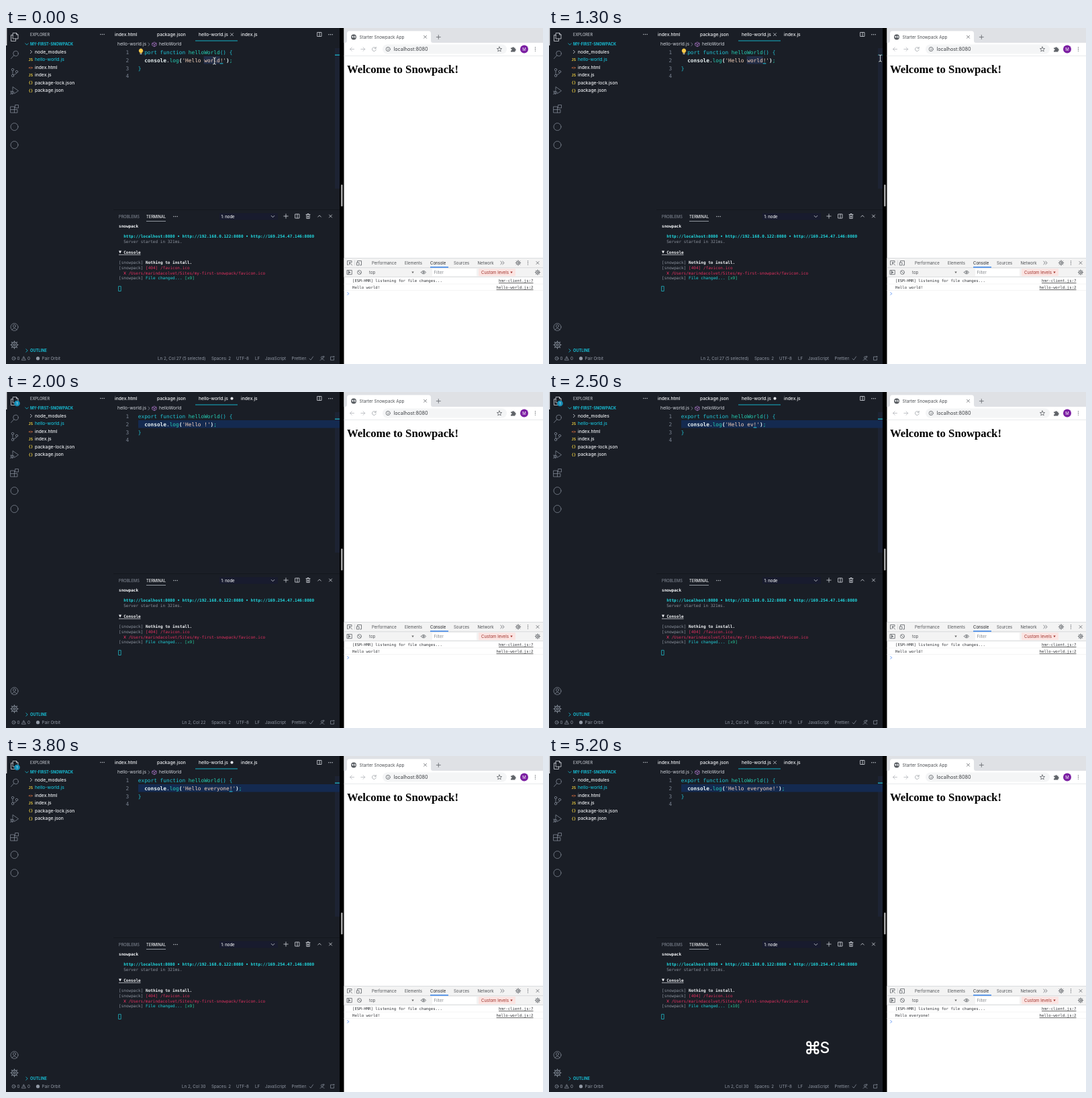
Recreate the animation shown at these times as an HTML page. Size 800 by 500 pixels, loop 5.3 s.

```html
<!DOCTYPE html>
<html lang="en">
<head>
<meta charset="utf-8">
<title>Editor and browser</title>
<style>
  html, body { margin: 0; width: 100%; height: 100%; overflow: hidden; background: #000; }
  svg { display: block; }
  text { font-family: Inter, "Open Sans", sans-serif; font-size: 6.7px; fill: #d3d7de; white-space: pre; }
  .b { font-weight: 700; }
  .ui { fill: #eef0f3; font-weight: 500; }
  .caps { font-size: 5.7px; }
  .muted { fill: #8f96a2; }
  .status { font-size: 6.2px; fill: #9299a5; }
  .cyan { fill: #17bcd3; }
  .code text { font: 7.79px "DejaVu Sans Mono", monospace; fill: #20c4d6; }
  .code .num { fill: #7b8492; }
  .code .fn { fill: #25cfb4; }
  .code .pale { fill: #e8f2f3; }
  .code .str { fill: #f8d3bb; }
  .term text { font: 6.05px "DejaVu Sans Mono", monospace; fill: #8b929d; }
  .term .b { font-weight: 700; fill: #f4f6f8; }
  .term .link { fill: #21dbe2; }
  .term .ok { fill: #21d0d8; }
  .term .count { fill: #27cf9e; }
  .term .bad { fill: #e0305f; }
  .chrome text { fill: #4a4d51; }
  .dev text { font-size: 6px; fill: #4e5155; }
  .log text { font: 5.71px "DejaVu Sans Mono", monospace; fill: #303236; }
  .line { fill: none; stroke-width: .8; stroke-linecap: round; stroke-linejoin: round; }
  .dim { stroke: #7f8793; }
  .lit { stroke: #d3d7de; }
  .grey { stroke: #5f6368; }
</style>
</head>
<body>
<svg width="800" height="500" viewBox="0 0 800 500">
  <defs>
    <path id="x" d="M-2-2 2 2M2-2-2 2"/>
    <path id="right" d="M-1.2-2.2 1.2 0-1.2 2.2"/>
    <path id="down" d="M-2.3-1.1 0 1.2 2.3-1.1"/>
    <g id="dots"><circle cx="-2.6" r=".7"/><circle r=".7"/><circle cx="2.6" r=".7"/></g>
    <g id="split"><rect x="-3" y="-3" width="6" height="6"/><path d="M0-3V3"/></g>
    <g id="gear"><circle r="2.6"/><circle r="1"/><path d="M0-3.8V-2.6M0 3.8V2.6M-3.8 0H-2.6M3.8 0H2.6M-2.7-2.7-1.9-1.9M2.7 2.7 1.9 1.9M2.7-2.7 1.9-1.9M-2.7 2.7-1.9 1.9"/></g>
    <path id="ibeam" d="M-2-5Q0-5 0-3.5Q0-5 2-5M0-3.5V3.5M-2 5Q0 5 0 3.5Q0 5 2 5"/>
  </defs>

  <!-- editor window -->
  <rect width="497" height="500" fill="#1a1e26"/>
  <path d="M160 270.5H497" stroke="#14171e"/>
  <rect width="1.3" height="26" fill="#e8ebef"/>

  <g class="line dim">
    <path class="lit" d="M10.5 7.5H15.5L18 10V16H10.5ZM15.5 7.5V10H18M10.5 10.5H7.5V19.5H14.5V16"/>
    <circle cx="14.5" cy="38" r="3.8"/><path d="M11.8 40.7 7.5 45.5"/>
    <circle cx="10" cy="62" r="1.7"/><circle cx="10" cy="71" r="1.7"/><circle cx="16" cy="65" r="1.7"/>
    <path d="M10 64V69M16 67Q15.5 69 11.5 69.5"/>
    <path d="M10 92V87.5L18.5 93.5 12.5 97.5"/><circle cx="9.5" cy="96" r="2.2"/><path d="M6.5 94 8 95M6.5 98.5 8 97.5M9.5 93.8V98"/>
    <path d="M7 117H12.5V126H7ZM7 121.5H17V126H12.5M14 114.5H18.5V119H14Z"/>
    <circle cx="12.5" cy="147" r="5.5"/>
    <circle cx="12.5" cy="174" r="5.5"/>
    <circle cx="12.5" cy="445" r="5.5"/><circle cx="12.5" cy="443.5" r="2"/><path d="M8.8 449Q12.5 444.5 16.2 449"/>
    <use href="#gear" transform="translate(12.5 471.5) scale(1.5)"/>
  </g>
  <g id="badge">
    <circle cx="16.5" cy="17" r="4.3" fill="#168fb8"/>
    <text x="16.5" y="19" text-anchor="middle" style="font-size:5px" class="ui">1</text>
  </g>

  <!-- explorer -->
  <text x="36" y="11.5" class="caps">EXPLORER</text>
  <use href="#dots" x="143.5" y="9.5" fill="#c4c8cf"/>
  <g class="line" stroke="#17bcd3"><use href="#down" x="31" y="24"/><use href="#right" x="31" y="480"/></g>
  <text x="36" y="26.2" class="caps b cyan">MY-FIRST-SNOWPACK</text>
  <text x="36" y="482.2" class="caps b cyan">OUTLINE</text>
  <use href="#right" x="37.5" y="35.5" class="line lit"/>
  <g id="files"></g>

  <!-- tabs and breadcrumb -->
  <text x="162" y="12" class="ui">index.html</text>
  <text x="225" y="12" class="ui">package.json</text>
  <text x="287" y="12" class="ui">hello-world.js</text>
  <text x="350" y="12" class="ui">index.js</text>
  <rect x="282" y="18.5" width="63" height="1" fill="#14afc6"/>
  <use id="close" href="#x" x="336.5" y="9.7" class="line lit"/>
  <circle id="unsaved" cx="336.5" cy="9.7" r="2.1" fill="#e4e7ec"/>
  <use href="#split" x="467" y="9.5" class="line lit"/>
  <use href="#dots" x="483.5" y="9.7" fill="#d3d7de"/>
  <text x="166" y="26.4">hello-world.js</text>
  <use href="#right" x="213" y="24.3" class="line dim"/>
  <path class="line" stroke="#a774c4" d="M218 22.7 221 21 224 22.7V26L221 27.7 218 26ZM218 22.7 221 24.3 224 22.7M221 24.3V27.7"/>
  <text x="228" y="26.4">helloWorld</text>

  <!-- code -->
  <g class="code">
    <rect x="490" y="30" width="7" height="209" fill="#1d2333"/>
    <rect id="row" x="197" y="42" width="300" height="11.5" fill="#142a50"/>
    <rect id="selection" x="294.6" y="42" width="24" height="11.5" fill="#222d47"/>
    <g id="numbers"></g>
    <text x="196.8" y="38.9">export function <tspan class="fn">helloWorld</tspan>() {</text>
    <text x="206.2" y="50.7" class="pale"><tspan class="b">console</tspan>.<tspan class="fn">log</tspan><tspan class="b">(</tspan><tspan class="str" id="string"></tspan><tspan class="b">)</tspan><tspan class="fn">;</tspan></text>
    <text x="196.8" y="62.5">}</text>
    <rect id="caret" y="52.3" width="4.6" height="1.1" fill="#29c3dc"/>
    <rect x="490" y="39.5" width="7" height="1.5" fill="#1b9fb4"/>
    <g id="bulb">
      <rect x="196" y="30" width="9" height="11" fill="#1a1e26"/>
      <path d="M199.3 36.5A3.2 3.2 0 1 1 202.7 36.5V37.5H199.3Z" fill="#f7c948"/>
      <path d="M199.6 38.6H202.4" stroke="#d5d9df"/>
    </g>
  </g>
  <g id="beam" class="line">
    <use href="#ibeam" stroke="#111" stroke-width="2"/>
    <use href="#ibeam" stroke="#c9d3dd" stroke-width="1.1"/>
  </g>

  <!-- terminal panel -->
  <text x="168" y="282.5" class="caps muted">PROBLEMS</text>
  <text x="209" y="282.5" class="caps ui">TERMINAL</text>
  <path d="M209 287.5H238" stroke="#aeb4bd" stroke-width=".8"/>
  <use href="#dots" x="252.5" y="280.5" fill="#c4c8cf"/>
  <rect x="318" y="275.5" width="87" height="10" fill="#181b2e"/>
  <text x="320.5" y="282.5" style="font-size:5.9px" class="ui">1: node</text>
  <g class="line lit">
    <use href="#down" x="397.5" y="280.5"/>
    <path d="M413.8 280H420.2M417 276.8V283.2"/>
    <use href="#split" x="434" y="280"/>
    <path d="M447 277.5H453M449 277.5V276.5H451V277.5M447.8 278V283.5H452.2V278M449.3 279.5V282M450.7 279.5V282"/>
    <use href="#down" transform="translate(467 280) scale(1 -1)"/>
    <use href="#x" x="483.5" y="280"/>
  </g>
  <g class="term">
    <text x="168" y="297.3" class="b">snowpack</text>
    <text x="175.2" y="312.3" class="b link">http://localhost:8080 • http://192.168.0.122:8080 • http://169.254.47.146:8080</text>
    <text x="175.2" y="320">Server started in 321ms.</text>
    <path d="M168 331.5H172L170 335.8Z" fill="#f0f2f5"/>
    <text x="175.2" y="335.8" class="b">Console</text>
    <path d="M168 337.5H200.5" stroke="#d8dce2" stroke-width=".7"/>
    <text x="168" y="351.2">[snowpack] <tspan class="b">Nothing to install.</tspan></text>
    <text x="168" y="358.8">[snowpack] <tspan class="bad">[404] /favicon.ico</tspan></text>
    <path class="line" stroke="#e0305f" d="M175.8 363 178.3 366.5M178.3 363 175.8 366.5"/>
    <text x="182.4" y="366.5" class="bad">/Users/marindacolvet/Sites/my-first-snowpack/favicon.ico</text>
    <text x="168" y="374.2">[snowpack] <tspan class="ok">File changed...</tspan> <tspan class="count" id="count"></tspan></text>
    <rect x="168" y="384.3" width="3.2" height="7.2" class="line" stroke="#20b9c6"/>
  </g>

  <!-- status bar -->
  <g class="line dim">
    <circle cx="11.5" cy="491.7" r="2.5"/><use href="#x" transform="translate(11.5 491.7) scale(.55)"/>
    <path d="M26.5 489 29.3 494.2H23.7ZM26.5 490.8V492.3"/>
    <path d="M452 492 454 494 457.5 489"/>
    <circle cx="471" cy="490.5" r="1.6"/><path d="M468 494.5Q471 490.5 474 494.5M472.5 488.5H474V490"/>
    <path d="M487 489.2H483.5V494.2H488.5V491.5"/><circle cx="488.2" cy="489.2" r=".7"/>
  </g>
  <circle cx="47.5" cy="491.7" r="2.6" fill="#9299a5"/>
  <text x="16.5" y="494" class="status">0</text>
  <text x="32" y="494" class="status">0</text>
  <text x="53.5" y="494" class="status">Pair Orbit</text>
  <text x="297.5" y="494" class="status" text-anchor="end" id="position"></text>
  <text x="306" y="494" class="status">Spaces: 2</text>
  <text x="343" y="494" class="status">UTF-8</text>
  <text x="371" y="494" class="status">LF</text>
  <text x="386" y="494" class="status">JavaScript</text>
  <text x="425.5" y="494" class="status">Prettier:</text>

  <!-- pressed keys -->
  <g id="command" fill="none" stroke="#fff" stroke-width="2.4">
    <path transform="scale(.95) translate(-12 -12)" d="M18 3a3 3 0 0 0-3 3v12a3 3 0 1 0 3-3H6a3 3 0 1 0 3 3V6a3 3 0 1 0-3 3h12a3 3 0 0 0 0-6z"/>
  </g>
  <text id="save" x="403.5" y="442" style="font-size:22.8px;font-weight:500;fill:#fff">S</text>

  <!-- gap with drag handle -->
  <rect x="499" y="233" width="2.6" height="32.5" rx="1.2" fill="#a4a4a4"/>

  <!-- browser -->
  <g class="chrome">
    <rect x="503.5" width="296.5" height="500" fill="#fff"/>
    <rect x="503.5" width="296.5" height="22" fill="#dfe1e5"/>
    <path d="M505 22Q508 22 508 19V8Q508 4.5 511.5 4.5H629.5Q633 4.5 633 8V19Q633 22 636 22Z" fill="#fff"/>
    <circle cx="518" cy="13.5" r="3.9" fill="#55595e"/>
    <path d="M515 12.5 517 11.5 518 13.5 516.5 15ZM519 11 521 13 520 15.5 518.7 13.5Z" fill="#e6e8ea"/>
    <text x="526.5" y="15.7" style="font-size:6.3px">Starter Snowpack App</text>
    <g class="line grey">
      <use href="#x" x="624.5" y="13.3"/>
      <path d="M641.3 13.5H647.3M644.3 10.5V16.5"/>
      <path d="M518.5 31.5H512.5M515.2 28.8 512.5 31.5 515.2 34.2M528.8 31.5H534.8M532 28.8 534.8 31.5 532 34.2" stroke="#b4b7bb"/>
      <path d="M550.8 30A2.9 2.9 0 1 0 551.2 32.3M551.2 28.3V30.3H549.2" stroke="#a0a4a9"/>
    </g>
    <rect x="561" y="24.5" width="185" height="14" rx="7" fill="#f4f5f6"/>
    <g class="line grey">
      <circle cx="569.2" cy="31.5" r="3.1"/><path d="M569.2 31.3V33M569.2 29.9V30"/>
      <path d="M735 28 736 30.4 738.6 30.6 736.6 32.3 737.2 34.8 735 33.5 732.8 34.8 733.4 32.3 731.4 30.6 734 30.4Z"/>
    </g>
    <text x="577.5" y="34.2" style="font-size:7.25px;fill:#3b3e42">localhost:8080</text>
    <path d="M752 29.5H754.2A1.3 1.3 0 1 1 756.8 29.5H758.5V31.2A1.3 1.3 0 1 1 758.5 33.8V35.5H752V33.5A1.2 1.2 0 1 0 752 31.2Z" fill="#5f6368"/>
    <circle cx="772" cy="31.5" r="6" fill="#7b1fa2"/>
    <text x="772" y="33.7" text-anchor="middle" style="font-size:6px;fill:#fff">M</text>
    <use href="#dots" transform="translate(788.5 31.5) rotate(90)" fill="#5f6368"/>
    <path d="M503.5 41.5H800" stroke="#e3e5e8" stroke-width=".8"/>
    <text x="508" y="67.3" style="font:700 16.7px 'Liberation Serif','Times New Roman',serif;fill:#000">Welcome to Snowpack!</text>
  </g>

  <!-- developer tools -->
  <g class="dev">
    <rect x="503.5" y="342.5" width="296.5" height="28" fill="#f3f3f3"/>
    <path d="M503.5 342.5H800M503.5 356.7H800M503.5 370.5H800" stroke="#cfd1d4" stroke-width=".7"/>
    <rect x="632" y="355.3" width="27" height="1.3" fill="#1a73e8"/>
    <g id="panes"></g>
    <rect x="635" y="358.2" width="66" height="11" fill="#fff"/>
    <rect x="704" y="358.2" width="55" height="11" fill="#fbe4e2"/>
    <text x="541" y="365.8">top</text>
    <text x="637.5" y="365.8" style="fill:#85888c">Filter</text>
    <text x="708" y="365.8" style="font-size:6.2px;fill:#a0322c">Custom levels</text>
    <path d="M604.3 362.6H607.7L606 365.3Z" fill="#666"/>
    <path d="M751.3 362.6H754.7L753 365.3Z" fill="#a0322c"/>
    <path d="M510.5 361.8 513.5 363.6 510.5 365.4Z" fill="#5f6368"/>
    <use href="#dots" transform="translate(777.5 349.5) rotate(90)" fill="#5f6368"/>
    <g class="line grey">
      <path d="M510 352.5H508.5V346.5H515V348.5M511.5 349 515.5 353M511.5 349V352M511.5 349H514.5"/>
      <path d="M523.5 348.5V346.5H529.5V349M522.8 349H526V353H522.8ZM527.5 353H529.5V349"/>
      <path d="M519.5 346V353" stroke="#d0d2d5"/>
      <path d="M508.3 360.5H515.3V366.7H508.3ZM510 360.5V366.7"/>
      <circle cx="526.5" cy="363.6" r="3"/><path d="M524.4 361.5 528.6 365.7"/>
      <path d="M618.3 363.6Q622 358.8 625.7 363.6Q622 368.4 618.3 363.6Z"/><circle cx="622" cy="363.6" r="1.1"/>
      <use href="#right" x="738" y="349.5"/><use href="#right" x="741" y="349.5"/>
      <use href="#gear" x="763" y="349.5"/><use href="#gear" x="792" y="363.6"/>
      <use href="#x" x="792" y="349.5"/>
    </g>
  </g>
  <g class="log">
    <path d="M503.5 381H800M503.5 390.5H800" stroke="#f0f0f0" stroke-width=".7"/>
    <text x="516" y="378.2">[ESM-HMR] listening for file changes...</text>
    <text x="516" y="388" id="output"></text>
    <g text-anchor="end" text-decoration="underline">
      <text x="785.5" y="378.2">hmr-client.js:7</text>
      <text x="785.5" y="388">hello-world.js:2</text>
    </g>
    <path class="line" stroke="#367cf1" d="M508.8 393.5 510.6 395.3 508.8 397.1"/>
  </g>
</svg>

<script>
const LOOP = 5300, STEP = 100;
const CUT = 1500, COMMAND = 4400, SAVE_KEY = 4900, SAVED = 5000;
const WORD = "everyone", KEYS = [2300, 2500, 2700, 2800, 2900, 3200, 3400, 3600];
const CHAR = 4.69, LEFT = 196.8;
const $ = id => document.getElementById(id);

function addText(parent, x, y, str, css = "") {
  const el = document.createElementNS("http://www.w3.org/2000/svg", "text");
  el.setAttribute("x", x);
  el.setAttribute("y", y);
  el.style.cssText = css;
  el.textContent = str;
  $(parent).append(el);
  return el;
}

const ICONS = { JS: "#e3c53f", "<>": "#dd7140", "{}": "#e3c53f" };
[["", "node_modules"], ["JS", "hello-world.js"], ["<>", "index.html"], ["JS", "index.js"],
 ["{}", "package-lock.json"], ["{}", "package.json"]].forEach(([icon, name], i) => {
  const y = 38 + i * 11.4;
  if (icon) addText("files", 33.5, y - .2, icon, `font:700 5.6px "DejaVu Sans Mono",monospace;fill:${ICONS[icon]}`);
  addText("files", 43, y, name, i === 1 ? "fill:#17bcd3" : "").setAttribute("class", "ui");
});
for (let i = 0; i < 4; i++)
  addText("numbers", 178.6, 38.9 + i * 11.8, i + 1).setAttribute("class", "num");
[[545, "Performance"], [594, "Elements"], [632, "Console"], [667, "Sources"], [702.5, "Network"]]
  .forEach(([x, name]) => addText("panes", x, 351.7, name, name === "Console" ? "fill:#202124" : ""));

const show = (id, on) => $(id).setAttribute("visibility", on ? "visible" : "hidden");
const put = (id, str) => { if ($(id).textContent !== str) $(id).textContent = str; };
const move = (id, x, y) => $(id).setAttribute("transform", `translate(${x} ${y})`);

function draw(t) {
  const cut = t >= CUT, saved = t >= SAVED, dirty = cut && !saved;
  const typed = KEYS.filter(k => t >= k).length;
  const col = cut ? 22 + typed : 27;

  put("string", `'Hello ${cut ? WORD.slice(0, typed) : "world"}!'`);
  put("position", `Ln 2, Col ${col}${cut ? "" : " (5 selected)"}`);
  put("count", saved ? "[x10]" : "[x9]");
  put("output", saved ? "Hello everyone!" : "Hello world!");

  // the caret blink restarts with each edit
  const edit = typed ? KEYS[typed - 1] : cut ? CUT : 0;
  show("caret", (t - edit) % 1000 < 500);
  $("caret").setAttribute("x", LEFT + (col - 1) * CHAR);

  show("row", cut);
  show("selection", !cut);
  show("bulb", !cut);
  show("badge", dirty);
  show("unsaved", dirty);
  show("close", !dirty);

  const p = Math.min(1, Math.max(0, (t - 200) / 700)), ease = p * p * (3 - 2 * p);
  show("beam", !cut);
  move("beam", 310.5 + 183 * ease, 49 - 4 * ease);

  show("command", t >= COMMAND);
  show("save", t >= SAVE_KEY);
  move("command", t >= SAVE_KEY ? 392.8 : 400.3, 434);
}

let start;
function tick(now) {
  start ??= now;
  const t = (now - start) % LOOP;
  draw(t - t % STEP);
  requestAnimationFrame(tick);
}
draw(0);
requestAnimationFrame(tick);
</script>
</body>
</html>
```
